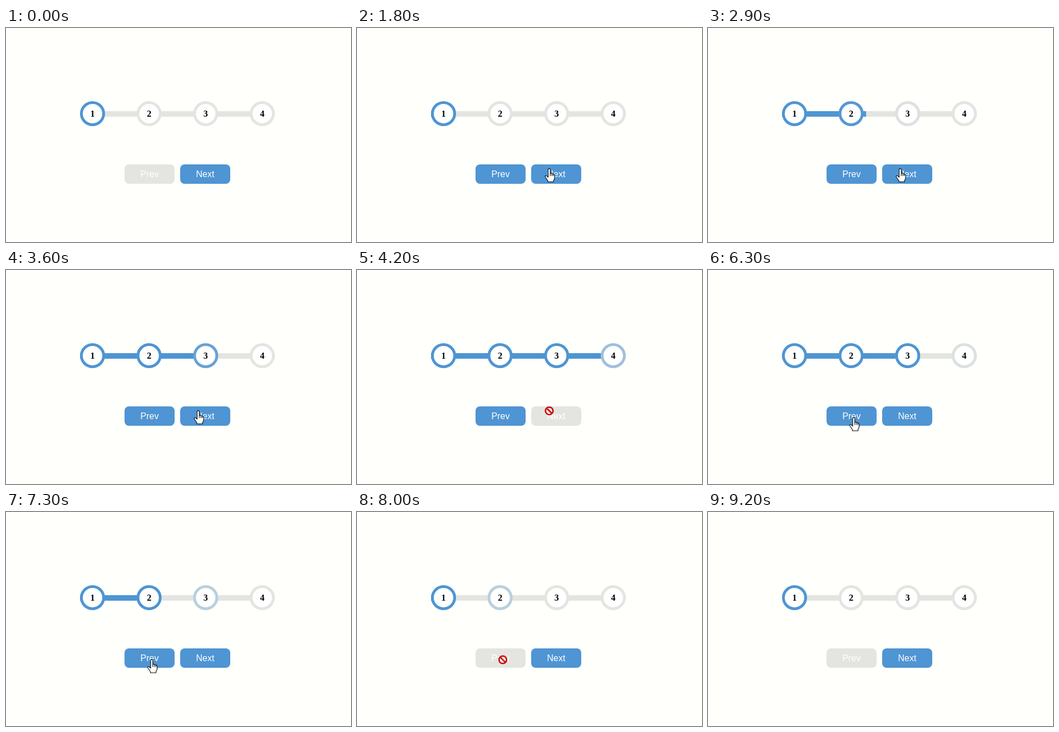
An HTML page that plays this animation: 620 by 386 pixels, repeating every 9.9 s.

```html
<!DOCTYPE html>
<html lang="en">
<head>
<meta charset="utf-8">
<title>Progress steps</title>
<style>
  html, body { margin: 0; width: 100%; height: 100%; overflow: hidden; background: #fffffc; }
  svg { display: block; }
  text { text-anchor: middle; }
  .step circle { fill: #fff; stroke-width: 5; }
  .step text { font: bold 16px "Liberation Serif", "Times New Roman", serif; }
  .button text { font: 16px "Liberation Sans", Arial, sans-serif; fill: #fff; }
  #hand, #arrow { fill: #fff; stroke: #000; stroke-width: 1.1; stroke-linejoin: round; }
  #blocked { fill: none; stroke: #cc0808; stroke-width: 2.6; }
</style>
</head>
<body>
<svg width="620" height="386" viewBox="0 0 620 386">
  <rect x="133" y="150" width="350" height="10" fill="#e4e5e1"/>
  <rect id="bar" x="133" y="150" height="10" fill="#4f95d3"/>
  <g id="steps"></g>
  <g id="buttons"></g>
  <g id="cursor">
    <path id="hand" d="M-2 14V1.5a1.9 1.9 0 0 1 3.8 0V8.5q2-1.4 3 .6q2-1 2.6.9q2.2-.6 2.2 1.8V16q0 3-2 5V23.5H-2.5V21.5L-7 14.8q-1-2.2.6-2.6 1.8-.2 4.4 3zM1.8 8.5V13M4.8 9.5V13M7.4 10.5V13"/>
    <path id="arrow" d="M0 0V16L3.7 12.6 6.2 18.4 8.6 17.4 6.1 11.7H11.3z"/>
    <path id="blocked" d="M-6.8 0a6.8 6.8 0 1 0 13.6 0a6.8 6.8 0 1 0-13.6 0M-4.8-4.8L4.8 4.8"/>
  </g>
</svg>
<script>
const LOOP = 9900, TICK = 100;
const GRAY = [228, 229, 225], BLUE = [79, 149, 211];
// [time, step that becomes current]
const clicks = [[1780, 2], [2800, 3], [3790, 4], [5780, 3], [6980, 2], [7680, 1]];
// [start, end, from, to] of the pointer
const moves = [
  [600, 1400, [352, 352], [345.5, 254]],
  [4700, 5500, [345.5, 254], [262, 266.5]],
  [8000, 8600, [262, 266.5], [266.5, 86.5]]
];

const $ = id => document.getElementById(id);
const clamp = x => Math.min(1, Math.max(0, x));
const lerp = (a, b, p) => a + (b - a) * p;
const mix = p => `rgb(${GRAY.map((g, i) => Math.round(lerp(g, BLUE[i], p)))})`;
const smooth = x => x * x * (3 - 2 * x);

// The CSS "ease" curve, cubic-bezier(.25, .1, .25, 1)
function ease(x) {
  if (x <= 0 || x >= 1) return clamp(x);
  let lo = 0, hi = 1, s;
  for (let i = 0; i < 20; i++) {
    s = (lo + hi) / 2;
    if (.75 * s * (1 - s) + s ** 3 < x) lo = s; else hi = s;
  }
  return .3 * s * (1 - s) ** 2 + 3 * s * s * (1 - s) + s ** 3;
}

// Follows a value through the clicks, with its own time for growing and shrinking
function transition(t, target, up, down) {
  let value = target(1), last = value;
  for (const [at, step] of clicks) {
    const next = target(step);
    if (t < at) break;
    if (next !== last) value = lerp(value, next, ease((t - at) / (next > last ? up : down)));
    last = next;
  }
  return value;
}

$('steps').innerHTML = [1, 2, 3, 4].map(n => {
  const x = 155.5 + (n - 1) * 305 / 3;
  return `<g class="step"><circle cx="${x}" cy="154.5" r="20"/><text x="${x}" y="160">${n}</text></g>`;
}).join('');
$('buttons').innerHTML = [['Prev', 213], ['Next', 313]].map(([label, x]) =>
  `<g class="button"><rect x="${x}" y="246" width="90" height="35" rx="8"/><text x="${x + 45}" y="269">${label}</text></g>`
).join('');
const rings = document.querySelectorAll('.step circle');
const boxes = document.querySelectorAll('.button rect');

function drawCursor(t, enabled) {
  let [x, y] = moves[0][2];
  for (const [start, end, from, to] of moves) {
    if (t < start) break;
    const p = smooth(clamp((t - start) / (end - start)));
    x = lerp(from[0], to[0], p);
    y = lerp(from[1], to[1], p);
  }
  const over = [213, 313].findIndex(left => x >= left && x < left + 90 && y >= 246 && y < 281);
  const shape = over < 0 ? 'arrow' : enabled[over] ? 'hand' : 'blocked';
  for (const id of ['arrow', 'hand', 'blocked']) $(id).style.display = id === shape ? '' : 'none';
  $('cursor').style.display = t >= 600 && t < 8700 ? '' : 'none';
  $('cursor').setAttribute('transform', `translate(${x} ${y})`);
}

function draw(t) {
  const step = clicks.reduce((s, [at, n]) => t >= at ? n : s, 1);
  const enabled = [step > 1, step < 4];
  $('bar').setAttribute('width', transition(t, n => (n - 1) * 350 / 3, 500, 500));
  rings.forEach((ring, i) =>
    ring.setAttribute('stroke', mix(transition(t, n => +(n > i), 1500, 750))));
  boxes.forEach((box, i) => box.setAttribute('fill', mix(+enabled[i])));
  drawCursor(t, enabled);
}

const begin = performance.now();
function frame() {
  const t = (performance.now() - begin) % LOOP;
  draw(Math.floor(t / TICK) * TICK);
  requestAnimationFrame(frame);
}
frame();
</script>
</body>
</html>
```
